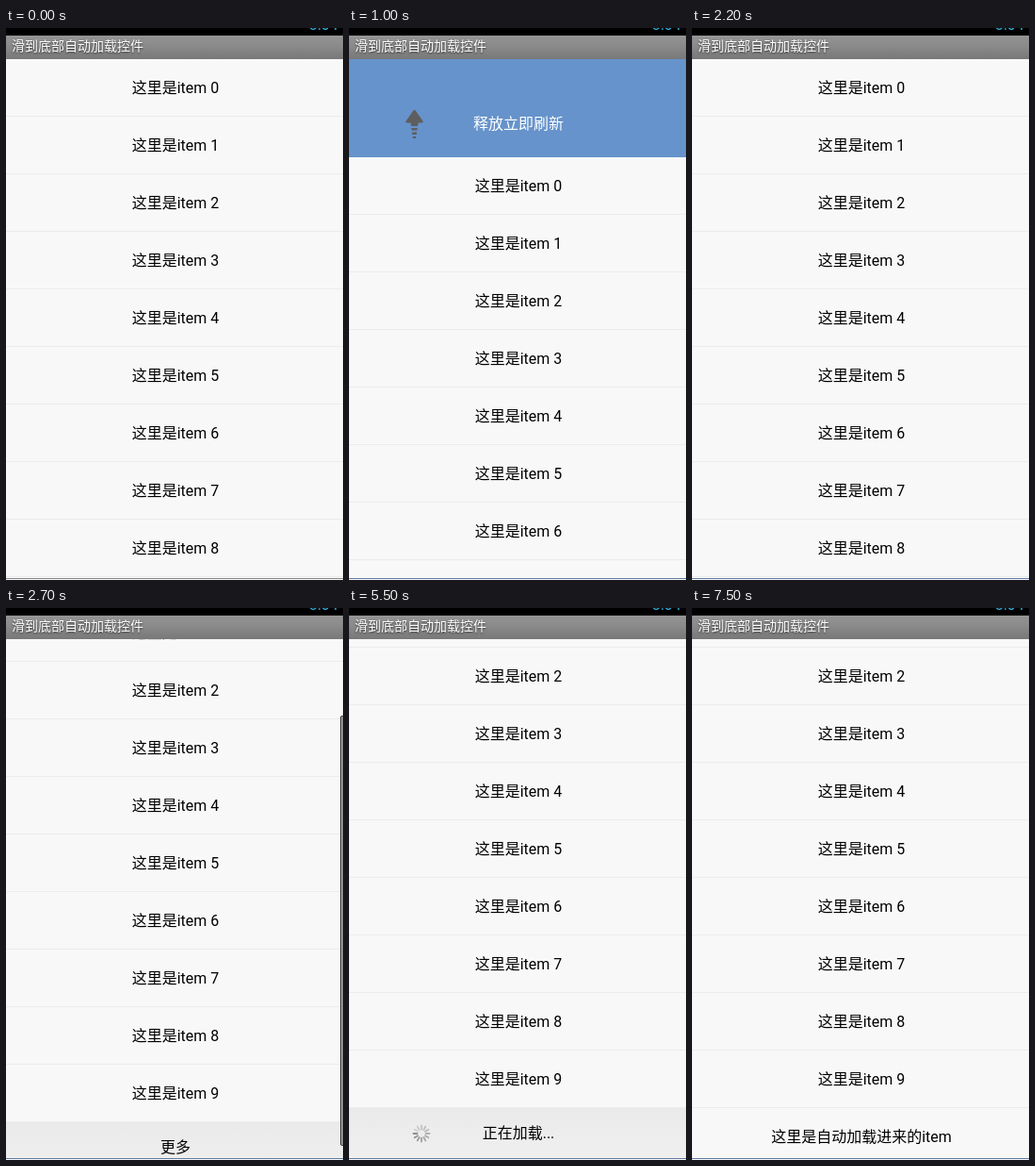
Animation of 358 by 585 pixels, one loop 8000 ms. Source, as an HTML page:

```html
<!DOCTYPE html>
<html lang="zh-CN">
<head>
<meta charset="utf-8">
<title>滑到底部自动加载控件</title>
<style>
  html, body { margin: 0; width: 100%; height: 100%; overflow: hidden; background: #f8f8f8; }
  body { position: relative; font: 16px Roboto, "Noto Sans CJK SC", sans-serif; color: #000; }
  body > div, #head, #list *, svg { position: absolute; }
  .status { left: 0; top: 0; width: 100%; height: 8px; background: #000; overflow: hidden; }
  .clock { position: absolute; left: 322px; top: -13px; line-height: 20px; color: #33b5e5; }
  .title {
    left: 0; top: 8px; width: 100%; height: 25px; box-sizing: border-box; padding-left: 6px;
    background: linear-gradient(#949494, #8a8a8a 45%, #787878);
    font-size: 14px; font-weight: 500; line-height: 23px; color: #fff;
    text-shadow: 0 1px 2px #333;
  }
  .view { left: 0; top: 33px; width: 100%; height: 550px; overflow: hidden; }
  #list { position: absolute; left: 0; top: 0; width: 360px; }
  .row, #foot, #label { width: 360px; text-align: center; white-space: pre; }
  .row { height: 60px; line-height: 61px; border-bottom: 1px solid #ececec; background: #f8f8f8; }
  #head { top: -300px; width: 360px; height: 300px; background: #6693cb; }
  #label { bottom: 0; height: 71px; line-height: 71px; font-weight: 500; color: #fff; }
  #arrow { left: 59px; top: 249px; }
  #foot { top: 610px; height: 53px; line-height: 53px; background: linear-gradient(#eaeaea, #efefef); }
  #bar {
    position: absolute; left: 355px; width: 5px; height: 456px; box-sizing: border-box;
    border: 1px solid #444; border-radius: 2px; background: #949494;
  }
  .edge { left: 0; top: 583px; width: 100%; height: 1px; }
</style>
</head>
<body>
<div class="status"><span class="clock">3:04</span></div>
<div class="view">
  <div id="list">
    <div id="head">
      <div id="label"></div>
      <svg id="arrow" width="21" height="32" fill="#5e5e5e">
        <path d="M9 1h3l.4 2h-3.8zM8.3 5h4.4l.4 2.5h-5.2zM7.6 9.5h5.8l.4 2.5h-6.6zM7 14h7l.5 3.5H18q2.8 0 1.2 2.2L11.7 30.5q-1.2 1.3-2.4 0L1.8 19.7Q.2 17.5 3 17.5h3.5z"/>
      </svg>
    </div>
    <div id="foot"><span id="more"></span></div>
  </div>
  <div id="bar"></div>
</div>
<div class="title">滑到底部自动加载控件</div>
<div class="edge" id="edge"></div>
<script>
const $ = id => document.getElementById(id);
const LOOP = 8000, ROW = 61, VIEW = 550, CONTENT = 663;

// [time, value] points, linear in between
const PULL = [[300, 0], [400, 9], [600, 50], [700, 71], [800, 86], [900, 97], [1100, 110],
              [1200, 110], [1300, 92], [1400, 79], [1500, 71], [1800, 71], [1900, 62], [2100, 18], [2200, 0]];
const SCROLL = [[2500, 0], [2600, 42], [2700, 98], [2800, 113]];
// ticks on which the spinner pauses
const PAUSES = [34, 37, 41, 44, 48, 51, 54, 57, 62, 66, 69, 73];

const clamp = v => Math.min(1, Math.max(0, v));

function at(points, t) {
  const i = points.findIndex(p => p[0] > t);
  if (i === 0) return points[0][1];
  if (i < 0) return points[points.length - 1][1];
  const [t0, a] = points[i - 1], [t1, b] = points[i];
  return a + (b - a) * (t - t0) / (t1 - t0);
}

function addRow(index, text) {
  const row = document.createElement('div');
  row.className = 'row';
  row.style.top = index * ROW + 'px';
  row.textContent = text;
  $('list').append(row);
  return row;
}

function addSpinner(parent, x, y, r, color, low, high) {
  let spokes = '';
  for (let i = 0; i < 12; i++) {
    const alpha = high - (high - low) * i / 11;
    spokes += `<line y1="${-r * 0.5}" y2="${-r + 0.7}" transform="rotate(${-30 * i})" opacity="${alpha}"/>`;
  }
  parent.insertAdjacentHTML('beforeend',
    `<svg width="20" height="20" viewBox="-10 -10 20 20" style="left:${x - 10}px;top:${y - 10}px">
      <g stroke="${color}" stroke-width="${r * 0.2}" stroke-linecap="round">${spokes}</g></svg>`);
  return parent.lastElementChild;
}

for (let i = 0; i < 10; i++) addRow(i, '这里是item ' + i);
const added = addRow(10, '这里是自动加载进来的item');
const headSpin = addSpinner($('head'), 68.5, 265, 7.7, '#fff', 0.2, 0.85);
const footSpin = addSpinner($('foot'), 76.5, 27, 9.2, '#666', 0.2, 0.7);
$('more').style.position = 'static';

const show = (el, on) => { el.style.visibility = on ? 'visible' : 'hidden'; };

function draw(time) {
  const tick = Math.floor(time % LOOP / 100), t = tick * 100;
  const pull = Math.round(at(PULL, t)), scroll = Math.round(at(SCROLL, t));
  const refreshing = t >= 1300, loading = t >= 2800, done = t >= 7500;

  $('list').style.transform = `translateY(${pull - scroll}px)`;
  $('label').textContent = refreshing ? '正在刷新...' : pull >= 71 ? '释放立即刷新' : '下拉可以刷新';
  show($('arrow'), !refreshing);
  $('arrow').style.transform = `rotate(${-180 * clamp((t - 700) / 250)}deg)`;

  const angle = 270 + 30 * (tick - PAUSES.filter(p => p <= tick).length);
  for (const spin of [headSpin, footSpin]) spin.firstElementChild.setAttribute('transform', `rotate(${angle})`);
  show(headSpin, refreshing);
  show(footSpin, loading && !done);
  show($('foot'), !done);
  show(added, done);
  $('more').textContent = loading ? '正在加载...' : '更多';

  $('bar').style.top = scroll * VIEW / CONTENT + 'px';
  $('bar').style.opacity = t < 2600 ? 0 : clamp((3300 - t) / 250);
  $('edge').style.background = t < 400 ? '#858585' : '#5f7ba3';
}

const start = performance.now();
function loop() {
  draw(performance.now() - start);
  requestAnimationFrame(loop);
}
loop();
</script>
</body>
</html>
```
